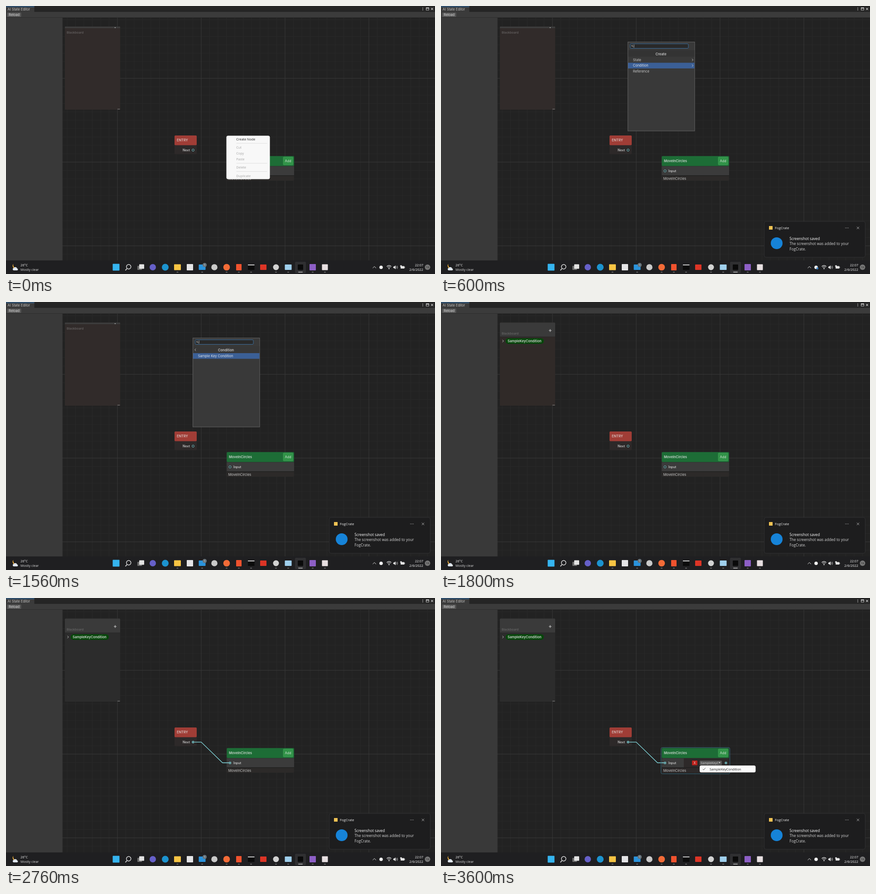
An HTML page that plays this animation: 947x592 px, repeating every 4.2 s.

```html
<!DOCTYPE html>
<html lang="en">
<head>
<meta charset="utf-8">
<title>State editor</title>
<style>
html, body { margin: 0; width: 100%; height: 100%; overflow: hidden; background: #222; }
svg { display: block; width: 947px; height: 592px; }
text { font: 7.4px Inter, sans-serif; fill: #c6c6c6; white-space: pre; }
.b { font-weight: 600; }
.w { font: 7.2px "Open Sans", "Noto Sans", sans-serif; }
</style>
</head>
<body>
<svg id="stage" viewBox="0 0 947 592" xmlns="http://www.w3.org/2000/svg"></svg>
<script>
const STEP = 600, COUNT = 7;
const CYAN = '#84dde2';

const rect = (x, y, w, h, fill, rx = 0, extra = '') =>
  `<rect x="${x}" y="${y}" width="${w}" height="${h}" fill="${fill}" rx="${rx}" ${extra}/>`;
const circle = (x, y, r, fill, extra = '') =>
  `<circle cx="${x}" cy="${y}" r="${r}" fill="${fill}" ${extra}/>`;
const line = (d, color, width = 1) =>
  `<path d="${d}" fill="none" stroke="${color}" stroke-width="${width}"/>`;
// y is the middle of the capitals
const text = (x, y, str, { size = 7.4, fill = '#c6c6c6', cls = '', anchor = 'start', extra = '' } = {}) =>
  `<text x="${x}" y="${y + size * 0.36}" class="${cls}" text-anchor="${anchor}" style="font-size:${size}px;fill:${fill}" ${extra}>${str}</text>`;
const sysText = (x, y, str, fill, size = 7.2, anchor = 'start') =>
  text(x, y, str, { size, fill, cls: 'w', anchor });
const chevron = (x, y, dir = 1, color = '#c8c8c8') =>
  line(`M${x - 1.3 * dir} ${y - 2.5}l${2.6 * dir} 2.5l${-2.6 * dir} 2.5`, color, 0.9);
const cross = (x, y, r, color, width = 0.9) =>
  line(`M${x - r} ${y - r}l${2 * r} ${2 * r}m0 ${-2 * r}l${-2 * r} ${2 * r}`, color, width);
const port = (x, y, on) =>
  circle(x, y, 2.4, '#222', `stroke="${CYAN}" stroke-width=".9"`) + (on ? circle(x, y, 1.3, CYAN) : '');

function grid() {
  let out = rect(124, 26, 823, 536, '#222');
  let minor = '', major = '';
  for (let i = -6; i < 38; i++) {
    const d = `M${(246 + i * 18.5).toFixed(1)} 26V562`;
    i % 10 ? minor += d : major += d;
  }
  for (let i = -7; i < 22; i++) {
    const d = `M124 ${(159.8 + i * 18.5).toFixed(1)}H947`;
    i % 10 ? minor += d : major += d;
  }
  return out + line(minor, '#292929') + line(major, '#393939');
}

function chrome() {
  return rect(0, 0, 947, 13, '#252525') + rect(0, 1, 62.5, 12, '#3a3a3a') + rect(0, 1, 62.5, 1.2, '#3573ae') +
    text(3.5, 7.6, 'AI State Editor') +
    [4, 6.5, 9].map(y => circle(920, y, 0.8, '#d0d0d0')).join('') +
    rect(927.5, 4, 6, 5, 'none', 0, 'stroke="#d0d0d0" stroke-width=".9"') + rect(927, 3.5, 7, 2, '#d0d0d0') +
    cross(940.5, 6.5, 2.4, '#d0d0d0', 1.1) +
    rect(0, 13, 947, 13, '#3b3b3b') + rect(0, 25.2, 947, 0.8, '#282828') +
    rect(2.5, 14.5, 31, 9.5, '#575757', 1.5) + text(6, 19.4, 'Reload', { fill: '#dcdcdc' }) +
    rect(0, 26, 123.5, 536, '#393939') + rect(123.5, 26, 1, 536, '#454545');
}

function taskbar() {
  const bar = rect(0, 562, 947, 30, '#1f1f21');
  const weather = `<path d="M16.5 569.5a6 6 0 1 0 9 9a7 7 0 0 1-9-9z" fill="#f3b23c"/>` +
    `<path d="M17 584a2.8 2.8 0 0 1 .3-5.5a4 4 0 0 1 7.2 1.2a2.2 2.2 0 0 1 .2 4.3z" fill="#dfe6ee"/>` +
    sysText(32, 572.3, '26°C', '#f2f2f2', 7.3) + sysText(32, 582.3, 'Mostly clear', '#d8d8d8');
  const active = rect(638, 565, 24, 25, '#2f2f31', 2);
  const search = circle(270.8, 576, 5, 'none', 'stroke="#e4e4e4" stroke-width="1.4"') + line('M267 580l-3.5 4', '#e4e4e4', 1.6);
  const views = rect(290, 574, 10, 9, '#6c6c6c', 1) + rect(294, 570.5, 11, 10, '#e2e2e2', 1);
  const disc = (x, r, color) => circle(x, 577, r, color);
  const box = (x, w, color, h = w) => rect(x - w / 2, 577 - h / 2, w, h, color, 1);
  const icons = box(243, 15, '#35b4ef') + disc(324, 7, '#6660c9') + disc(351.5, 7.5, '#1c93cf') +
    box(378.5, 15, '#f6c443', 13) + box(406, 14, '#e4e4e6') + box(433, 15, '#2a93dc', 12) +
    disc(460, 6.8, '#c9c9c9') + disc(487, 7.3, '#f36b37') + box(514, 12, '#f0522e', 14) +
    rect(534, 571, 14.5, 12, '#0b0b0b', 0.5) + rect(534, 571, 14.5, 2, '#c8c8c8') +
    box(568, 14, '#dd3426', 12) + disc(596, 6.5, '#d2d2d2') + box(623, 15, '#9fcfed', 12) +
    box(650, 12, '#0a0a0a') + box(677, 14, '#8d5fc6') + box(704, 13, '#e7dfe1') +
    circle(438.5, 572, 4.6, '#68747c') + sysText(438.5, 572, '1', '#e8e8e8', 6, 'middle');
  const marks = [378.5, 433, 487, 514, 541, 596, 623, 677, 704]
    .map(x => rect(x - 2, 587.3, 4, 1.3, '#8c8c8c', 0.6)).join('') + rect(645, 587, 10, 1.6, '#bcbcbc', 0.8);
  const tray = line('M809.5 579l3.7-3.6l3.7 3.6', '#e4e4e4', 1) +
    line('M840.5 575.5q5-4.6 10 0M842.3 577.7q3.2-3 6.4 0', '#e8e8e8', 1.1) + circle(845.5, 580, 1.3, '#e8e8e8') +
    '<path d="M855 575.5h2l3-2.6v8.6l-3-2.6h-2z" fill="#e8e8e8"/>' +
    line('M861.5 575.2q1.6 2 0 4M863 573.7q3 3.5 0 7', '#e0e0e0', 0.8) +
    rect(871, 574.5, 8.5, 5.5, '#e4e4e4', 1) + rect(879.6, 576, 1, 2.5, '#e4e4e4') + circle(872, 574.5, 2, '#e4e4e4') +
    sysText(921, 572.3, '22:07', '#f2f2f2', 7.2, 'end') + sysText(921, 582.3, '2/6/2022', '#f2f2f2', 7.4, 'end') +
    circle(930.5, 577, 6, '#767676') + sysText(930.5, 577, '16', '#1c1c1c', 6, 'middle');
  return bar + weather + active + search + views + icons + marks + tray;
}

function blackboard(open, fill) {
  let out = rect(130, 45.5, 122, 183.5, fill, 1.5);
  if (open) {
    out += rect(130, 45.5, 122, 31.5, '#3a3a3a', 1.5) + rect(130, 76.5, 122, 0.8, '#242424') +
      text(134, 69.2, 'Blackboard', { size: 6.8, fill: '#636363', cls: 'b' }) +
      line('M238 63h6M241 60v6', '#d2d2d2', 1.1) + chevron(136.8, 86.2, 1, '#d8d8d8') +
      rect(142.5, 80, 84.5, 12.5, '#07460b', 6) +
      text(147, 86.2, 'SampleKeyCondition', { cls: 'b', fill: '#d0d6d0' });
  } else {
    out += rect(130, 45.5, 122, 3.5, '#3c3c3c') + rect(240, 47, 1.7, 1.5, '#cfcfcf') +
      text(134, 58.4, 'Blackboard', { size: 6.8, fill: '#625e5e', cls: 'b' });
  }
  return out + rect(246, 227.3, 5.5, 1, '#8a8a8a');
}

function nodes(linked, filled) {
  const pad = filled ? '#2d2929' : '#2c2a29';
  let out = rect(372, 286, 49, 41.5, '#2d2929', 2) + rect(372, 286, 49, 21.5, '#a03d36', 2) +
    text(377, 296.7, 'ENTRY', { cls: 'b', fill: '#d4bfbd' }) +
    text(390, 318.3, 'Next', { size: 7, cls: 'b', fill: '#c2c2c2' }) + port(413, 318.3, linked);
  out += rect(487.3, 331.5, 148.7, 54.5, pad, 2) + rect(487.3, 331.5, 148.7, 22, '#1d6d36', 2) +
    rect(487.3, 354.2, filled ? 48.7 : 148.7, 19.8, '#3b3b3b') + rect(487.3, 374, 148.7, 1.2, '#1d1d1d') +
    rect(612, 333.5, 21.5, 17.5, '#319348', 1.5, 'stroke="#4aa45e" stroke-width=".6"') +
    text(492, 342.6, 'MoveInCircles', { cls: 'b', fill: '#c6d3ca' }) +
    text(622.7, 342.6, 'Add', { size: 7.2, anchor: 'middle', fill: '#d4e2d7' }) +
    text(502, 364.3, 'Input', { size: 6.9, cls: 'b' }) + port(494.5, 364.3, linked) +
    text(490.8, 380.8, 'MoveInCircles', { size: 7.5 });
  if (linked) out += line('M416 318.3H431L478 364H492', CYAN, 1.3);
  if (filled) {
    out += rect(485.7, 330.3, 152, 58, 'none', 3, 'stroke="#37687c" stroke-width="1"') +
      rect(554, 359, 12, 10.5, '#bd211b', 1) + text(560, 364.3, 'X', { size: 7, anchor: 'middle', fill: '#eadada' }) +
      rect(571, 359.2, 49, 10.3, '#565656', 1.5) +
      '<clipPath id="cut"><path d="M571 359h41.3v11H571z"/></clipPath>' +
      text(573, 364.3, 'SampleKeyCondition', { size: 6.8, extra: 'clip-path="url(#cut)"' }) +
      '<path d="M612.8 362.6h4.2l-2.1 3z" fill="#d4d4d4"/>' + port(629, 364.3, true);
  }
  return out;
}

function contextMenu() {
  const items = [[294.6, 'Create Node'], [312.6, 'Cut'], [325.4, 'Copy'], [338.2, 'Paste'], [356.6, 'Delete'], [375, 'Duplicate']];
  return rect(486.5, 286.5, 96, 96, '#f8f8f8', 4) +
    [303.3, 347.3, 365.5].map(y => rect(508.5, y - 0.4, 68, 0.8, '#dadada')).join('') +
    items.map(([y, s], i) => sysText(508.3, y, s, i ? '#a3a3a3' : '#222')).join('');
}

function searchWindow(title, rows, pick, nested) {
  const rowY = i => 119.2 + i * 12.4;
  let out = rect(412.5, 79.5, 147.5, 196.5, '#393939', 0, 'stroke="#626262" stroke-width="1"') +
    rect(413, 97.5, 146.5, 14.5, nested ? '#373737' : '#333') +
    rect(417.5, 83.5, 128.5, 10, '#292929', 2, 'stroke="#3b6f9f" stroke-width="1"') +
    circle(421.8, 87.8, 1.4, 'none', 'stroke="#b8b8b8" stroke-width=".8"') + line('M422.8 88.8l1.8 1.8', '#b8b8b8', 0.9) +
    rect(425.6, 85, 0.8, 7, '#d0d0d0') +
    text(485.5, 105.8, title, { size: 7.5, cls: 'b', anchor: 'middle' }) +
    rect(413, rowY(pick) - 6.2, 146.5, 12.5, '#3b5f96');
  rows.forEach((s, i) => {
    out += text(423.7, rowY(i), s, { size: 7.5, fill: i === pick ? '#dfe4ec' : '#c6c6c6' });
    if (!nested && i < 2) out += chevron(555.2, rowY(i));
  });
  return out + (nested ? chevron(418, 105.6, -1) : '');
}

function toast() {
  return rect(713.5, 476, 223, 79, '#1d1d1e', 4, 'stroke="#303032" stroke-width="1"') +
    rect(724, 486, 8, 8, '#efc253', 0.5) + sysText(737, 490, 'FogCrate', '#f0f0f0', 7.6) +
    [893, 896, 899].map(x => circle(x, 490.2, 0.65, '#d4d4d4')).join('') + cross(920.5, 490.2, 2.6, '#d8d8d8', 0.8) +
    circle(741, 524, 13, '#1683d8') +
    sysText(769.3, 513.8, 'Screenshot saved', '#fff', 8.2) +
    sysText(769.3, 525.2, 'The screenshot was added to your', '#d4d4d4', 8.2) +
    sysText(769.3, 536.8, 'FogCrate.', '#d4d4d4', 8.2);
}

function choicePopup() {
  return rect(571, 370, 123.5, 15.3, '#fafafa', 3.5) + line('M577.8 377.8l2 2l3.8-4.2', '#333', 0.9) +
    sysText(593, 378, 'SampleKeyCondition', '#222');
}

const backdrop = grid() + chrome() + taskbar();
const boardFill = ['#312b2a', '#312b2a', '#312b2a', '#302a28', '#2c2c2c', '#342929', '#2c2c2c'];

function scene(n) {
  let out = backdrop + circle(828, 577.3, 3.8, '#f0f0f0');
  if (n === 1) out += circle(830.8, 579.6, 2.3, '#3d86c9');
  out += blackboard(n >= 3, boardFill[n]) + nodes(n >= 4, n >= 5);
  if (n === 0) out += contextMenu();
  if (n === 1) out += searchWindow('Create', ['State', 'Condition', 'Reference'], 1, false);
  if (n === 2) out += searchWindow('Condition', ['Sample Key Condition'], 0, true);
  if (n === 6) out += choicePopup();
  return out + (n ? toast() : '');
}

const stage = document.getElementById('stage');
const start = performance.now();
let shown = -1;

function tick() {
  const n = Math.floor((performance.now() - start) / STEP) % COUNT;
  if (n !== shown) stage.innerHTML = scene(shown = n);
  requestAnimationFrame(tick);
}
tick();
</script>
</body>
</html>
```
